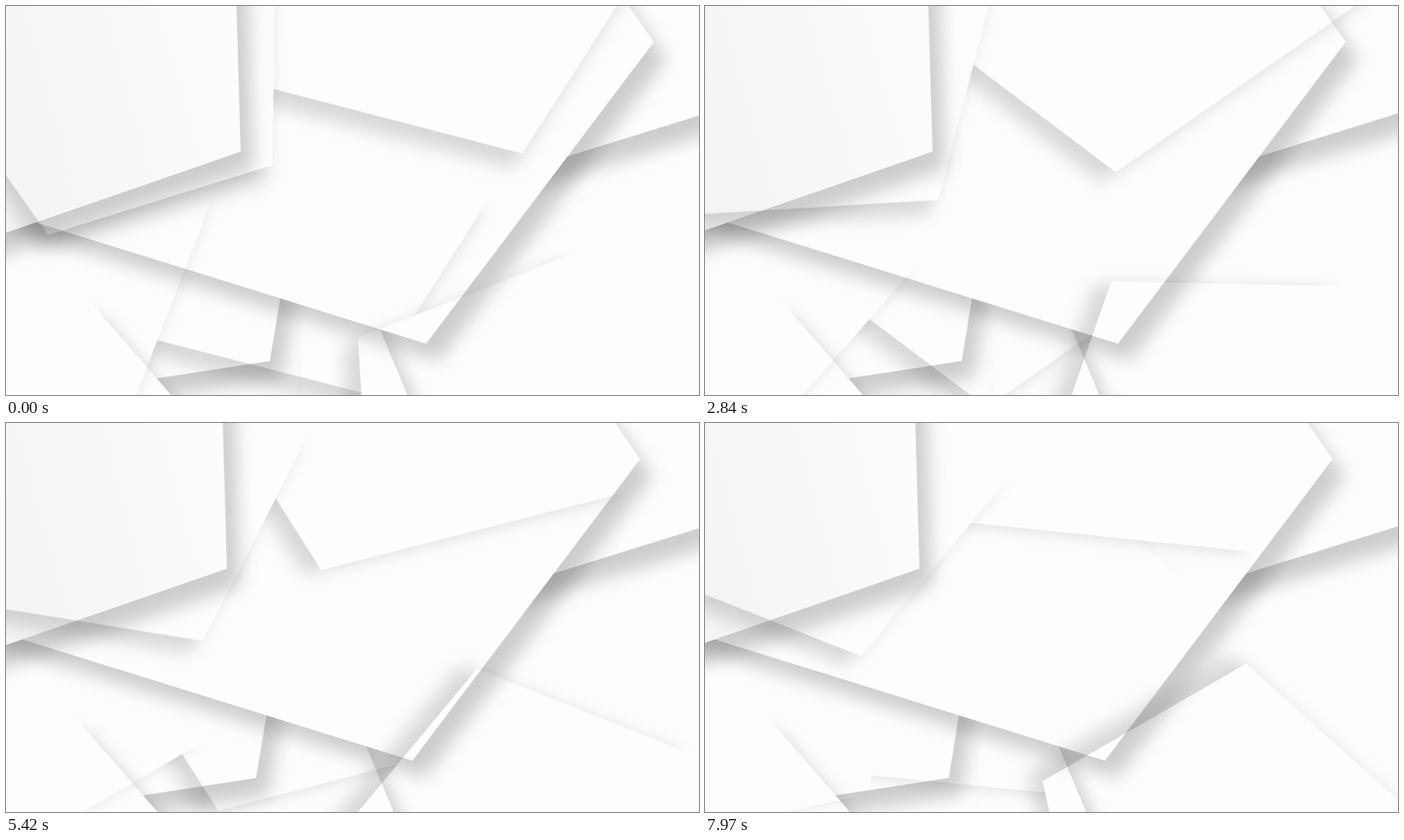
Recreate the animation shown at these times as an HTML page. Size 998 by 561 pixels, loop 8 s.

```html
<!DOCTYPE html>
<html lang="en">
<head>
<meta charset="utf-8">
<title>White paper layers</title>
<style>
  html, body { margin: 0; width: 100%; height: 100%; overflow: hidden; background: #fdfdfd; }
  #stage { position: relative; width: 100%; height: 100%; overflow: hidden; isolation: isolate; background: #fdfdfd; }
  svg { position: absolute; inset: 0; width: 100%; height: 100%; overflow: hidden; }
  #sheets { mix-blend-mode: multiply; }
  #pan { animation: pan 8s linear infinite; }
  .spin { animation: spin 8s linear infinite; }
  .shadow { filter: blur(13px); }
  #pentagons .shadow { fill: rgba(0, 0, 0, .145); }
  #sheets .shadow { fill: rgba(0, 0, 0, .19); }
  #pentagons .face { fill: #fdfdfd; }
  #sheets .face { fill: #fff; }
  #sheets .tinted { fill: url(#tint); }
  @keyframes pan { to { transform: translateX(-29.2px); } }
  @keyframes spin {
    from { transform: rotate(var(--from)); }
    to { transform: rotate(var(--to)); }
  }
</style>
</head>
<body>
<div id="stage">
  <svg id="pentagons" viewBox="0 0 998 561"></svg>
  <svg id="sheets" viewBox="0 0 998 561">
    <defs>
      <linearGradient id="tint" gradientUnits="userSpaceOnUse" x1="0" y1="180" x2="330" y2="90">
        <stop offset="0" stop-color="#f6f6f6"/>
        <stop offset="1" stop-color="#fefefe"/>
      </linearGradient>
    </defs>
    <g id="pan"></g>
  </svg>
</div>
<script>
  const LOOP = 8;
  const RAD = Math.PI / 180;

  // Back to front; angles in degrees, speed in degrees per second.
  const pentagons = [
    { x: 411, y: 291, r: 288, angle: 68.4, speed: 7.94, light: 125 },
    { x: 22.2, y: 342.9, r: 288, angle: 345.2, speed: 7.1, light: 125 },
    { x: 599.5, y: -154.5, r: 394.5, angle: 68.6, speed: 7.94, light: 122 },
    { x: 749.5, y: 633.5, r: 288, angle: 212.6, speed: 7.95, light: 146 },
    { x: 153, y: 57.2, r: 288, angle: 36.7, speed: 4.88, light: 108 }
  ];

  const sheets = [
    { points: "1100,126.3 720,244.4 720,-60 1100,-60" },
    { points: "525,434 591,592 591,640 430,640 420,430" },
    { points: "400,390 380,512 -20,573.5 -60,300" },
    { points: "119,424 270,598 270,660 -60,660 -60,424" },
    { points: "933,52 605,487 -60,280 -60,-60 855.5,-60" },
    { points: "330.3,-60 338,210 -60,347.8 -60,-60", tinted: true }
  ];

  const pair = (points, dx, dy, face = "face") =>
    `<polygon class="shadow" points="${points}" transform="translate(${dx} ${dy})"/>` +
    `<polygon class="${face}" points="${points}"/>`;

  const regular = r => Array.from({ length: 5 }, (_, i) =>
    `${r * Math.cos(i * 72 * RAD)},${r * Math.sin(i * 72 * RAD)}`).join(" ");

  const pentagon = ({ x, y, r, angle, speed, light }) => {
    const dir = (light - angle) * RAD;
    const turn = `--from:${angle}deg;--to:${angle + speed * LOOP}deg`;
    return `<g transform="translate(${x} ${y})"><g class="spin" style="${turn}">` +
      pair(regular(r), 25 * Math.cos(dir), 25 * Math.sin(dir)) + "</g></g>";
  };

  document.getElementById("pentagons").innerHTML = pentagons.map(pentagon).join("");
  document.getElementById("pan").innerHTML = sheets
    .map(s => pair(s.points, 18, 25, s.tinted ? "tinted" : "face")).join("");
</script>
</body>
</html>
```
